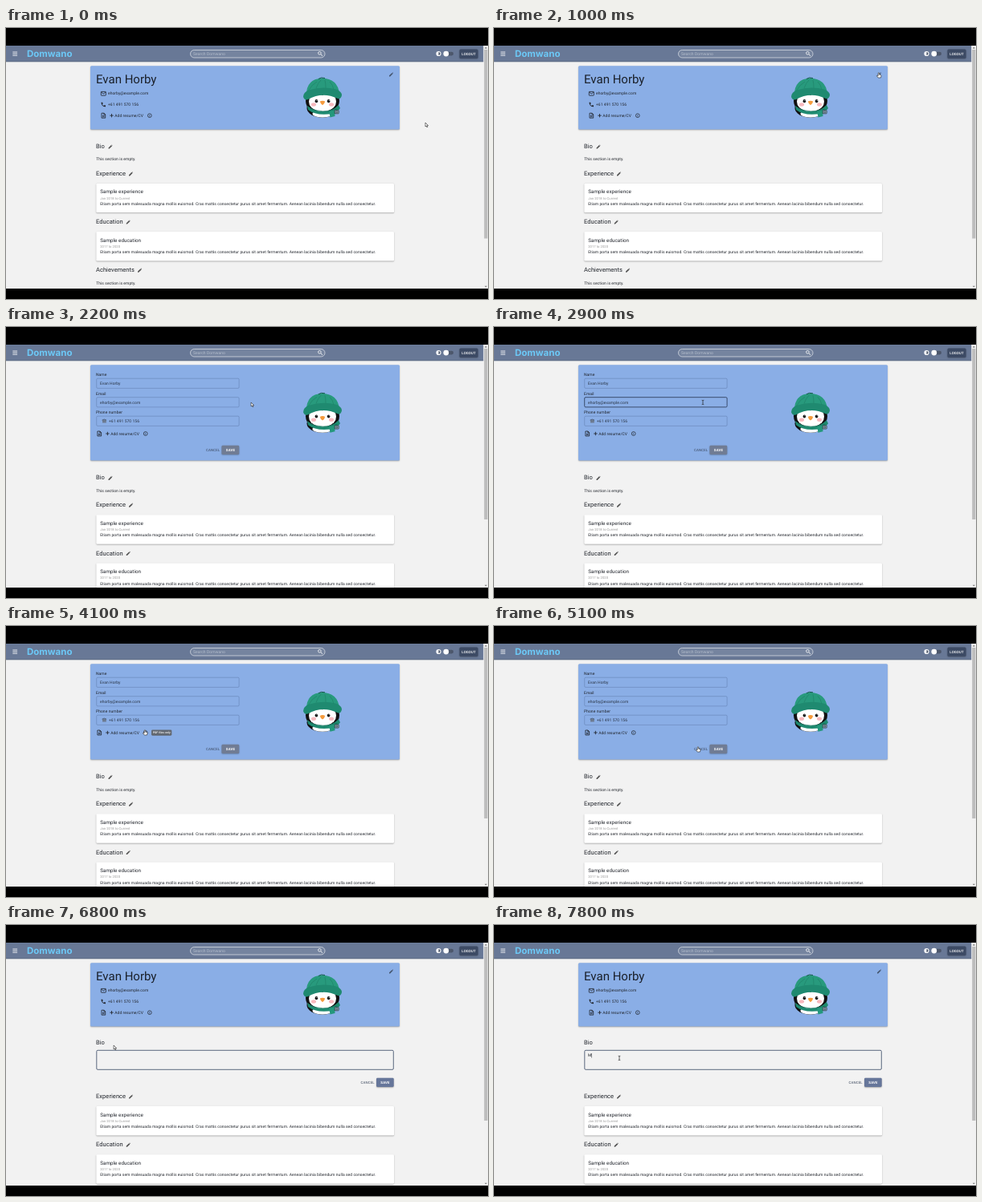
An HTML page with a canvas for the animation above (8000 ms loop, 600 px wide and 338 px high).

```html
<!DOCTYPE html>
<html lang="en">
<head>
<meta charset="utf-8">
<title>Profile page</title>
<style>
html, body { margin: 0; width: 100%; height: 100%; overflow: hidden; background: #000; }
canvas { display: block; width: 600px; height: 338px; }
</style>
</head>
<body>
<canvas id="stage"></canvas>
<script>
const LOOP = 8000, STEP = 100;
const EDIT_ON = 1100, EDIT_OFF = 5300, BIO_ON = 6700, TYPED = 7700;
const TIP_ON = 3900, TIP_OFF = 4700;
const INK = '#20242b', BLUE = '#8aaee6', SLATE = '#687896';
const USER = 'Evan Horby', MAIL = 'ehorby@example.com', PHONE = '+61 491 570 156', BRAND = 'Domwano';
const LOREM = 'Etiam porta sem malesuada magna mollis euismod. Cras mattis consectetur purus sit amet fermentum. Aenean lacinia bibendum nulla sed consectetur.';

// time, x, y of the pointer
const PATH = [
  [0, 522, 118], [100, 522, 118], [900, 479, 57], [1100, 479, 57], [1300, 476, 63],
  [1800, 335, 107], [2000, 335, 107], [2500, 250, 70], [2900, 260, 94], [3300, 235, 112],
  [3800, 173, 131], [4700, 173, 131], [5100, 254, 152], [5300, 254, 152], [5600, 199, 149],
  [6000, 159, 151], [6400, 130, 147], [6700, 130, 147], [7100, 156, 166], [8000, 156, 166]
];
const FIELDS = [64, 87.5, 111];

const canvas = document.getElementById('stage');
const ctx = canvas.getContext('2d', { alpha: false });
const dpr = window.devicePixelRatio || 1;
canvas.width = 600 * dpr;
canvas.height = 338 * dpr;

function rect(x, y, w, h, color) {
  ctx.fillStyle = color;
  ctx.fillRect(x, y, w, h);
}

function box(x, y, w, h, r, fill, stroke, line = 0.6) {
  ctx.beginPath();
  ctx.roundRect(x, y, w, h, r);
  if (fill) { ctx.fillStyle = fill; ctx.fill(); }
  if (stroke) { ctx.strokeStyle = stroke; ctx.lineWidth = line; ctx.stroke(); }
}

function ellipse(x, y, rx, ry, color, turn = 0) {
  ctx.beginPath();
  ctx.ellipse(x, y, rx, ry, turn, 0, Math.PI * 2);
  ctx.fillStyle = color;
  ctx.fill();
}

function ring(x, y, r, color, line) {
  ctx.beginPath();
  ctx.arc(x, y, r, 0, Math.PI * 2);
  ctx.strokeStyle = color;
  ctx.lineWidth = line;
  ctx.stroke();
}

function shape(d, fill, stroke, line = 0.7) {
  const p = new Path2D(d);
  if (fill) { ctx.fillStyle = fill; ctx.fill(p); }
  if (stroke) { ctx.strokeStyle = stroke; ctx.lineWidth = line; ctx.stroke(p); }
}

// y is the middle of the capitals
function text(s, x, y, size = 4.98, color = INK, { weight = 400, align = 'left', space = 0.0107, font = 'Roboto' } = {}) {
  ctx.font = `${weight} ${size}px ${font}, sans-serif`;
  ctx.letterSpacing = size * space + 'px';
  ctx.textAlign = align;
  ctx.fillStyle = color;
  ctx.fillText(s, x, y + size * 0.355);
}

function at(x, y, draw) {
  ctx.save();
  ctx.translate(x, y);
  draw();
  ctx.restore();
}

function shadowBox(x, y, w, h, r, fill) {
  ctx.save();
  ctx.shadowColor = 'rgba(0,0,0,.35)';
  ctx.shadowBlur = 1.6 * dpr;
  ctx.shadowOffsetY = 0.7 * dpr;
  box(x, y, w, h, r, fill);
  ctx.restore();
}

function pencil(x, y, color = '#555') {
  at(x, y, () => {
    shape('M-2.5 2.5V1.3L.9-2.1 2.1-.9-1.3 2.5ZM1.3-2.4 1.7-2.7 2.7-1.7 2.4-1.3Z', color);
  });
}

function docIcon(x, y) {
  at(x, y, () => {
    shape('M-2.3-3H.8L2.4-1.4V3H-2.3ZM.6-3V-1.2H2.4M-1.2.2H1.3M-1.2 1.6H1.3', null, INK, 0.8);
  });
}

function phoneIcon(x, y) {
  at(x, y, () => {
    shape('M-2.7-2.8H-1L-.6-1-1.4-.3Q-.8.9.4 1.5L1.1.7 2.8 1.1V2.8Q-2.6 2.6-2.7-2.8Z', INK);
  });
}

function infoIcon(x, y) {
  ring(x, y, 2.4, INK, 0.7);
  rect(x - 0.3, y - 0.3, 0.6, 1.6, INK);
  rect(x - 0.3, y - 1.3, 0.6, 0.6, INK);
}

function resumeRow(x, y) {
  docIcon(x, y);
  shape(`M${x + 8} ${y}h4.4M${x + 10.2} ${y - 2.2}v4.4`, null, INK, 0.85);
  text('Add resume/CV', x + 14, y);
  infoIcon(x + 57.5, y);
}

function penguin(dy) {
  at(394, 87 + dy, () => {
    ellipse(0, 13, 19.5, 11.5, '#111');
    ellipse(0, 4, 21, 17, '#111');
    ellipse(0, 20, 12.5, 4.5, '#fff');
    ellipse(-7, 4.5, 10, 10.5, '#fff');
    ellipse(7, 4.5, 10, 10.5, '#fff');
    ellipse(0, 9, 13.5, 8.5, '#fff');
    ellipse(-11, 8.5, 3, 2.2, '#f8b8bd');
    ellipse(11, 8.5, 3, 2.2, '#f8b8bd');
    ellipse(-7.6, 4.2, 1.8, 2.1, '#111');
    ellipse(7.6, 4.2, 1.8, 2.1, '#111');
    ellipse(-7.1, 3.4, 0.5, 0.5, '#fff');
    ellipse(8.1, 3.4, 0.5, 0.5, '#fff');
    shape('M-3.2 4.6Q0 2.8 3.2 4.6Q2.6 7.8 0 9.2Q-2.6 7.8-3.2 4.6Z', '#f59b3d');
    // scarf
    shape('M-19 10Q-10 17 0 17Q12 17 20 9L22 13Q18 19 12 20Q-8 23-18 15Z', '#1f8a70');
    shape('M8 16L15 15 15.5 23 9.5 24.5Z', '#24987c');
    shape('M-16 13Q0 20 18 14', null, '#176a57', 0.6);
    // hat
    shape('M-20-4Q-20-23-1-24.5Q19-24 21-5Q0-13-20-4Z', '#289a7d');
    shape('M-24-1Q-24-7-17-9.5Q0-15 17-10.5Q24-8 24-3Q23 2 19 1Q0-8-18 2Q-22 4-24-1Z', '#1f8a70');
    shape('M-18-8Q-13-17-7-20M-8-12Q-6-18-2-22M4-12Q4-18 3-22M14-10Q13-16 9-20', null, '#208369', 0.7);
    shape('M-5-23.5Q-2-26 3-24.5', null, '#14584a', 1);
    // camera badge
    box(15.2, 15.6, 5, 4.2, 0.6, '#93a9ba', '#26343a', 0.7);
    ring(17.7, 17.7, 1, '#26343a', 0.6);
  });
}

function header() {
  rect(0, 22, 594.5, 20, SLATE);
  rect(0, 41.5, 594.5, 0.8, '#58667f');
  for (const y of [30, 32.1, 34.2]) rect(8.3, y - 0.4, 5.8, 0.8, '#fff');
  text(BRAND, 26, 32.2, 11.5, '#6cc8f6', { weight: 700, space: 0, font: 'Inter' });
  box(229.5, 27.5, 167.5, 9.5, 4.75, '#75849f', '#d5dae3', 0.8);
  text('Search ' + BRAND, 233, 32.3, 5, '#b4bdcc');
  ring(390.4, 31.3, 1.8, '#fff', 0.8);
  shape('M391.8 32.7L394 34.8', null, '#fff', 0.9);
  ellipse(538.5, 32, 3.1, 3.1, '#fff');
  shape('M538.5 30A2 2 0 0 1 538.5 34Z', '#444f63');
  box(545, 29.8, 12, 4.6, 2.3, '#4c576b');
  ellipse(547.8, 32.1, 3.4, 3.4, '#fff');
  shadowBox(564.5, 26.5, 23, 11.3, 1.5, '#3c4a64');
  text('LOGOUT', 576, 32.2, 4.4, '#fff', { weight: 500, align: 'center', space: 0.02 });
}

function scrollbar(top, bottom) {
  rect(594.5, 22, 5.5, 303, '#f1f1f1');
  rect(595.2, top, 4.2, bottom - top, '#bdbdbd');
  shape('M595.8 25.4L597.3 23.7 598.8 25.4Z', '#666');
  shape('M595.8 321.8L597.3 323.5 598.8 321.8Z', '#777');
}

function profile() {
  shadowBox(105, 47.3, 385, 79.2, 1.5, BLUE);
  text(USER, 112, 63.8, 15, '#1b212b', { space: 0 });
  box(118.3, 79.4, 6, 4.8, 0.5, null, INK, 0.8);
  shape('M118.5 80L121.3 82 124.1 80', null, INK, 0.8);
  text(MAIL, 127, 81.7);
  phoneIcon(121.2, 95.5);
  text(PHONE, 127, 95.4);
  resumeRow(121.3, 109.2);
  pencil(479.5, 58, '#45566f');
  penguin(0);
}

function buttons(x, y, saveColor) {
  text('CANCEL', x - 2.3, y, 4.35, '#39465c', { weight: 400, align: 'right', space: 0.027 });
  shadowBox(x, y - 5.6, 21.7, 11.2, 1.4, saveColor);
  text('SAVE', x + 10.9, y, 4.35, '#fff', { weight: 700, align: 'center', space: 0.02 });
}

function form(t, px, py) {
  shadowBox(105, 47.3, 385, 119.3, 1.5, BLUE);
  const rows = [['Name', USER], ['Email', MAIL], ['Phone number', PHONE]];
  rows.forEach(([label, value], i) => {
    const y = FIELDS[i];
    text(label, 112, y - 4.6);
    const hover = overField(px, py) === i;
    box(112.7, y + 0.2, 177.4, 12.2, 1.3, null, hover ? '#26344f' : 'rgba(45,65,100,.42)', hover ? 0.8 : 0.55);
    text(value, i === 2 ? 128 : 117, y + 6.4, 4.98, '#293343');
  });
  box(120, 115.8, 4.8, 3.6, 0.5, '#6c7b91');
  shape('M119.5 116.2Q122.2 114 125 116.2', null, '#46546a', 0.8);
  resumeRow(116.2, 133);
  buttons(268.5, 153.3, '#707c94');
  penguin(20.3);
  if (t >= TIP_ON && t < TIP_OFF) {
    box(181, 129.4, 25.3, 7.3, 1.4, '#626871');
    text('PDF files only', 193.7, 133.1, 3.5, '#fff', { weight: 500, align: 'center' });
  }
}

function heading(s, y, penX) {
  text(s, 112, y, 7.5, INK, { space: 0.0075 });
  if (penX) pencil(penX, y + 0.6);
}

function entry(title, date, y) {
  shadowBox(112.3, y, 370.7, 36.4, 1.3, '#fff');
  text(title, 117.2, y + 10.2, 6.25, INK, { space: 0.009 });
  text(date, 117.2, y + 18.2, 4.15, '#999');
  text(LOREM, 117.2, y + 25.3);
}

function sections(bioY, restY) {
  heading('Experience', restY, 155.5);
  entry('Sample experience', 'Jan 2018 to Current', restY + 12.6);
  heading('Education', restY + 60.2, 152.2);
  entry('Sample education', '2017 to 2020', restY + 72.8);
  heading('Achievements', restY + 120.4, 166.5);
  text('This section is empty.', 112.3, restY + 136.6);
  if (bioY) {
    heading('Bio', bioY, 130);
    text('This section is empty.', 112.3, bioY + 16);
  }
}

function bioEditor(t) {
  heading('Bio', 146.2);
  box(112.8, 156.3, 369.5, 24, 1.3, null, '#4a5872', 0.9);
  if (t >= TYPED) text('M', 117, 162.7, 4.98, INK);
  if (t >= TYPED || t % 1000 < 500) rect(t >= TYPED ? 121.5 : 117, 160, 0.5, 5.6, INK);
  buttons(461, 196.4, '#66769a');
}

function pointerAt(t) {
  let i = 1;
  while (i < PATH.length - 1 && PATH[i][0] < t) i++;
  const [t0, x0, y0] = PATH[i - 1], [t1, x1, y1] = PATH[i];
  const u = Math.min(1, Math.max(0, (t - t0) / (t1 - t0)));
  const k = u * u * (3 - 2 * u);
  return [x0 + (x1 - x0) * k, y0 + (y1 - y0) * k];
}

function overField(x, y) {
  return x > 112 && x < 290 ? FIELDS.findIndex(f => y > f && y < f + 12.5) : -1;
}

function near(x, y, cx, cy, rx, ry = rx) {
  return Math.abs(x - cx) < rx && Math.abs(y - cy) < ry;
}

function pointer(t, x, y, editing, bio) {
  const beam = (editing && overField(x, y) >= 0) || (bio && x > 113 && x < 482 && y > 156 && y < 181);
  const hand = editing
    ? near(x, y, 476, 61, 6) || near(x, y, 173.5, 133, 4) || near(x, y, 257, 153, 11, 6)
    : near(x, y, 479.5, 58, 4) || (!bio && near(x, y, 130, 148, 4));
  at(x, y, () => {
    if (beam) {
      shape('M-1.3-2.7Q0-2.7 0-2Q0-2.7 1.3-2.7M0-2V2M-1.3 2.7Q0 2.7 0 2Q0 2.7 1.3 2.7', null, '#222', 0.7);
    } else if (hand) {
      shape('M-.8-1Q0-1.8.7-1V1.2L2.5 1.6Q3.1 1.8 3 2.6L2.5 5H-.8L-2.6 2.6Q-2.3 1.6-.8 2.6Z', '#fff', '#222', 0.6);
    } else {
      shape('M0 0V5L1.1 4 1.9 5.8 2.8 5.4 2 3.7H3.6Z', '#fff', '#222', 0.6);
    }
  });
}

function draw(t) {
  const editing = t >= EDIT_ON && t < EDIT_OFF, bio = t >= BIO_ON;
  const [px, py] = pointerAt(t);
  ctx.setTransform(dpr, 0, 0, dpr, 0, 0);
  ctx.textRendering = 'geometricPrecision';
  rect(0, 0, 600, 338, '#000');
  ctx.save();
  ctx.beginPath();
  ctx.rect(0, 22, 600, 303);
  ctx.clip();
  rect(0, 22, 600, 303, '#f2f2f2');
  if (editing) {
    form(t, px, py);
    sections(187.8, 221.7);
  } else {
    profile();
    if (bio) {
      bioEditor(t);
      sections(0, 213.5);
    } else {
      sections(147.5, 181.3);
    }
  }
  header();
  scrollbar(27, editing ? 240 : bio ? 244 : 262.5);
  pointer(t, px, py, editing, bio);
  ctx.restore();
}

const start = performance.now();
function tick() {
  const t = (performance.now() - start) % LOOP;
  draw(Math.floor(t / STEP) * STEP);
  requestAnimationFrame(tick);
}
tick();
</script>
</body>
</html>
```
